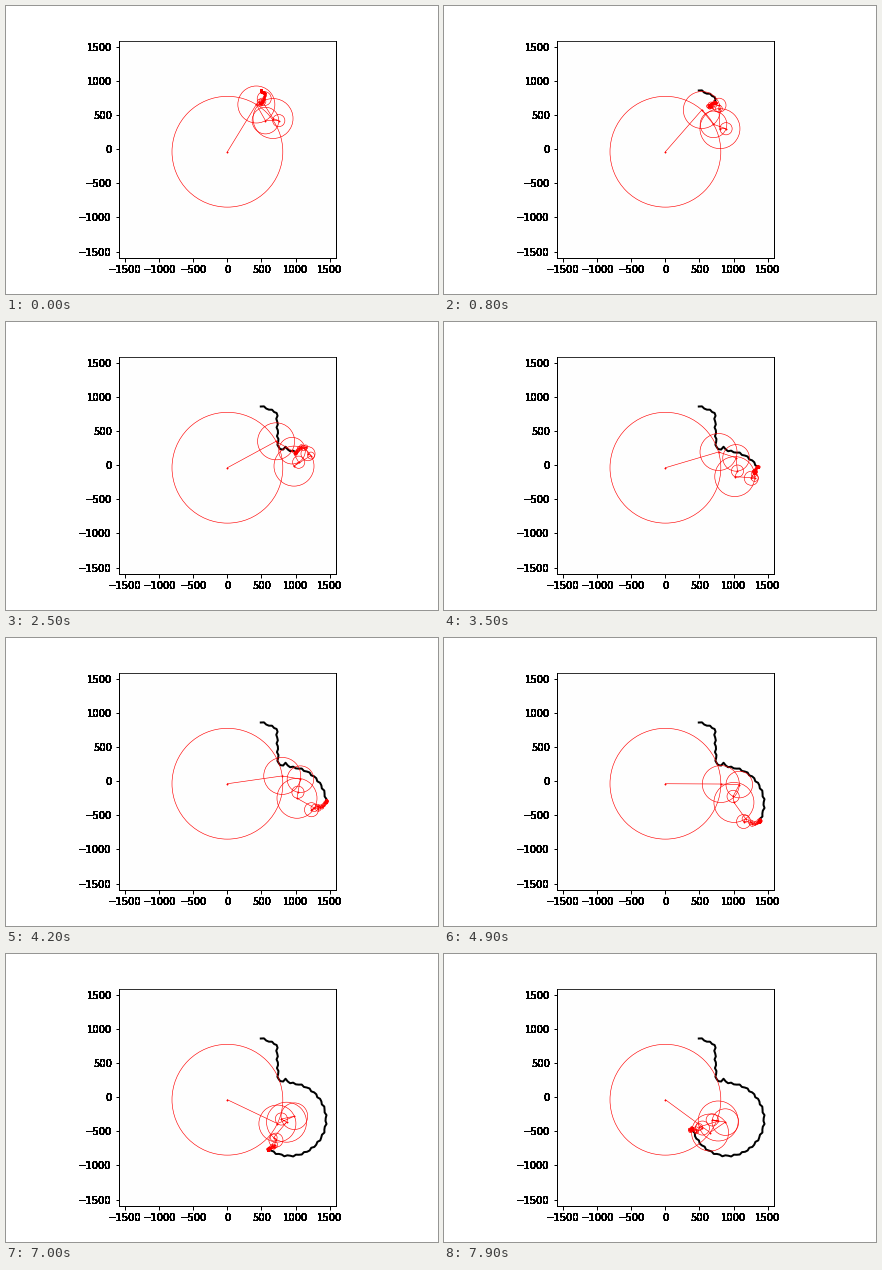
A matplotlib script that plays this animation: 432 by 288 pixels, repeating every 8 s.

```python
import numpy as np
import matplotlib.pyplot as plt
from matplotlib.animation import FuncAnimation
from matplotlib.collections import EllipseCollection

FRAMES, TURN, ORDER = 80, 300, 150
LIMIT = 1595
UNIT = 2 * LIMIT / 217.44  # data units per pixel
ORIGIN = -36j
RED = "#ff0000"


def outline(count):
    """Two straight edges, a notch and a rippled arc, in equal steps."""
    edges = np.array([255 + 84j, 270.7 + 90.5j, 272.3 + 126.5j,
                      276 + 127.5j, 279.5 + 125.5j])
    arc = 283.7 + 165.6j + 36.3 * np.exp(1j * np.radians(np.arange(-88, 168)))
    z = np.r_[edges, arc]
    dist = np.r_[0, np.cumsum(np.abs(np.diff(z)))]
    s = np.linspace(0, dist[-1], count)
    z = np.interp(s, dist, z)
    tangent = np.gradient(z)
    ripple = 0.8 * np.cos(2 * np.pi * (s - 28) / 8.3)
    z = z - 1j * ripple * tangent / np.abs(tangent)
    return np.conj(z - (221.4 + 143.28j)) * UNIT


def polar(pixels, degrees):
    return pixels * UNIT * np.exp(1j * np.radians(degrees))


def build_chain():
    """Arms turning -1, 1, -2, 2, ... times; the small ones are fitted."""
    freq = np.array([s * n for n in range(1, ORDER + 1) for s in (-1, 1)])
    main = np.array([polar(55.4, 58.5), polar(18.5, -60.5), polar(13.3, 0),
                     polar(6.1, 160), polar(20, 122)])
    spin = np.exp(2j * np.pi * np.outer(np.arange(FRAMES), freq) / TURN)
    m = len(main)
    rest = outline(FRAMES) - ORIGIN - spin[:, :m] @ main
    weight = 1 / np.abs(freq[m:])
    fit = np.linalg.lstsq(spin[:, m:] * weight, rest, rcond=1e-6)[0]
    return np.r_[main, weight * fit], spin


def xy(z):
    return np.column_stack([z.real, z.imag])


coef, spin = build_chain()
joints = ORIGIN + np.cumsum(np.c_[np.zeros(FRAMES), spin * coef], axis=1)
tips = joints[:, -1]

fig = plt.figure(figsize=(6, 4), dpi=72, facecolor="white")
fig.subplots_adjust(left=0.125, right=0.9, bottom=0.125, top=0.88)
ax = fig.add_subplot(facecolor="#fefefe")
ax.set(xlim=(-LIMIT, LIMIT), ylim=(-LIMIT, LIMIT), aspect="equal")

ticks = range(-1500, 1501, 500)
ax.set_xticks(ticks)
ax.set_yticks(ticks)
ax.tick_params(width=1, labelbottom=False, labelleft=False)
ax.spines[["left", "right", "bottom"]].set_linewidth(1)

# Labels are stacked so that their soft edges turn solid black
x_pos, x_va, x_ha = ax.get_xaxis_text1_transform(7)
y_pos, y_va, y_ha = ax.get_yaxis_text1_transform(7)
for v in ticks:
    label = str(v).replace("-", "\u2212")
    for _ in range(24):
        ax.text(v, 0, label, transform=x_pos, va=x_va, ha=x_ha, size=10)
        ax.text(0, v, label, transform=y_pos, va=y_va, ha=y_ha, size=10)

trace, = ax.plot([], [], color="black", lw=2, zorder=2)
size = 2 * np.abs(coef)
circles = EllipseCollection(
    size, size, np.zeros(len(size)), units="xy", offsets=xy(joints[0, :-1]),
    offset_transform=ax.transData, facecolors="none", edgecolors=RED,
    linewidths=0.6, zorder=3)
ax.add_collection(circles, autolim=False)
arms, = ax.plot([], [], color=RED, lw=0.6, marker="o", ms=1.5, mew=0.3, zorder=4)


def update(k):
    circles.set_offsets(xy(joints[k, :-1]))
    arms.set_data(joints[k].real, joints[k].imag)
    trace.set_data(tips[:k + 1].real, tips[:k + 1].imag)
    return trace, circles, arms


anim = FuncAnimation(fig, update, frames=FRAMES, interval=100,
                     repeat=True, repeat_delay=0)
plt.show()
```
